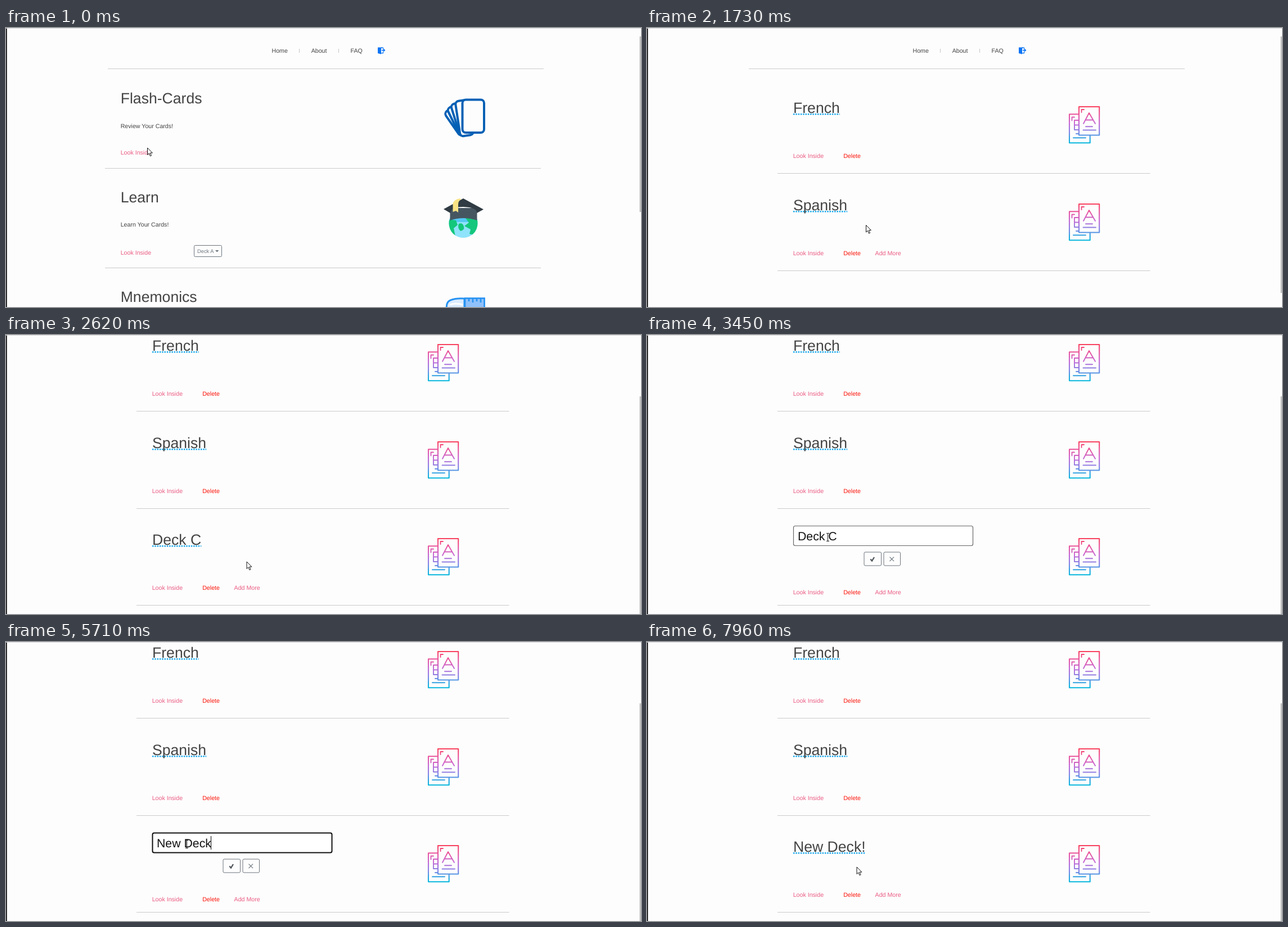
An HTML page with a canvas for the animation above (8000 ms loop, 1129 by 496 pixels).

```html
<!DOCTYPE html>
<html lang="en">
<head>
<meta charset="utf-8">
<title>Flash cards</title>
<style>
  html, body { margin: 0; width: 100%; height: 100%; overflow: hidden; background: #fdfdfd; }
  canvas { display: block; }
</style>
</head>
<body>
<canvas id="stage" width="1129" height="496"></canvas>
<script>
const ctx = document.getElementById('stage').getContext('2d', { alpha: false });
const LOOP = 8000, BODY = 10.64, HEAD = 26.6, FIELD = 21.28, ROW = 172.5;
const PINK = '#ea5a82', RED = '#fb1208', INK = '#444', GRAY = '#6c757d', RULE = '#cbcbcb', PAPER = '#fdfdfd';

// [start time, x, y, shape]
const pointer = [
  [0, 251, 212.5, 'arrow'], [120, 241, 219, 'hand'], [400, 241, 219, 'arrow'],
  [770, 244, 220, 'arrow'], [890, 256, 221, 'arrow'], [1010, 276, 221, 'arrow'],
  [1130, 302, 222, 'arrow'], [1250, 326, 222, 'arrow'], [1370, 341, 223, 'arrow'],
  [1490, 349, 262, 'arrow'], [1610, 366, 310, 'arrow'], [1730, 389, 350, 'arrow'],
  [1850, 409, 380, 'arrow'], [1970, 422, 396, 'arrow'], [2090, 429, 398, 'hand'],
  [2350, 427.5, 402.5, 'arrow'], [2770, 425, 403, 'arrow'], [2910, 390, 386, 'arrow'],
  [3050, 350, 369, 'arrow'], [3170, 320, 359, 'hand'], [3450, 321.5, 359.5, 'beam'],
  [6670, 326.5, 361.5, 'beam'], [6790, 337.5, 366.5, 'beam'], [6910, 343.5, 368.5, 'beam'],
  [7060, 360, 379, 'arrow'], [7180, 387, 394, 'arrow'], [7300, 411, 404, 'hand'],
  [7570, 408, 404, 'arrow'], [7690, 399, 402, 'arrow'], [7810, 389, 399, 'arrow'],
  [7960, 372.5, 399.5, 'arrow']
];
const scroll = [[0, 0], [2350, 6.7], [2500, 112], [2620, 123]];
// [start time, text, first selected character, caret shown]
const typing = [
  [3450, 'Deck C', 9, false], [3590, 'Deck C', 5, false], [3870, 'Deck C', 0, false],
  [4770, 'N', 9, true], [5050, 'Ne', 9, true], [5170, 'New', 9, true], [5290, 'New D', 9, true],
  [5440, 'New De', 9, true], [5590, 'New Dec', 9, true], [5710, 'New Deck', 9, true],
  [6240, 'New Deck!', 9, true], [6790, 'New Deck!', 9, false], [7300, 'New Deck!', 9, true]
];
const at = (steps, t) => steps.filter(s => s[0] <= t).pop();

function font(size) {
  ctx.font = `${size}px "Liberation Sans", Arial, sans-serif`;
}
function text(str, x, y, size = BODY, color = INK) {
  font(size);
  ctx.fillStyle = color;
  ctx.fillText(str, x, y);
}
function box(x, y, w, h, color) {
  ctx.fillStyle = color;
  ctx.fillRect(x, y, w, h);
}
function shape(d, fill, stroke, width = 1) {
  const path = new Path2D(d);
  if (fill) { ctx.fillStyle = fill; ctx.fill(path); }
  if (stroke) { ctx.strokeStyle = stroke; ctx.lineWidth = width; ctx.stroke(path); }
}
function round(x, y, w, h, r, fill, stroke, width = 1) {
  ctx.beginPath();
  ctx.roundRect(x, y, w, h, r);
  if (fill) { ctx.fillStyle = fill; ctx.fill(); }
  ctx.strokeStyle = stroke;
  ctx.lineWidth = width;
  ctx.stroke();
}
function placed(x, y, draw) {
  ctx.save();
  ctx.translate(x, y);
  draw();
  ctx.restore();
}

function nav() {
  text('Home', 472.5, 44);
  text('About', 542.7, 44);
  text('FAQ', 612.5, 44);
  box(521, 37, 1, 7, '#c4c4c4');
  box(591, 37, 1, 7, '#c4c4c4');
  shape('M661 34.5H669V36L667 36V46.5L661 45Z', '#0b74f5');
  shape('M667 35H670.5V37.5M670.5 42V44.7H667', null, '#0b74f5', 1.2);
  shape('M668 38.7H671V36.5L674.5 39.5L671 42.5V40.4H668Z', '#0b74f5');
  box(181, 72, 775, 1, RULE);
}

function fanIcon() {
  const blue = '#0460b5';
  for (let i = 4; i > 0; i--) {
    placed(808, 193, () => {
      ctx.rotate(-i * 8.7 * Math.PI / 180);
      const h = 67 - i * 4;
      round(0, -h, 24, h, 6, PAPER, blue, 4);
    });
  }
  round(811.5, 127.5, 38.5, 58.5, 6, PAPER, blue, 4);
}

function globeIcon() {
  ctx.save();
  ctx.beginPath();
  ctx.arc(813, 347.5, 25.5, 0, 7);
  ctx.clip();
  box(785, 320, 56, 56, '#8fe3fb');
  box(785, 320, 56, 25, '#55c8f5');
  shape('M786 340L800 342L803 350L796 356L799 370L786 364Z', '#14c77c');
  shape('M817 338H842V356L832 368L824 366L826 358L815 352L823 346Z', '#14c77c');
  shape('M805 348Q812 345 814 353Q816 359 808 361Q802 355 805 348Z', '#14c77c');
  ctx.restore();
  shape('M789.5 320H837.5V342Q813 334 789.5 342Z', '#465661');
  shape('M778 322L813 303L849 322.5L837 329Q838 319 813 318Q790 318 790 329Z', '#303b43');
  shape('M807 303Q796 305 794.5 312V327L800 325L804 328V314Q804 307 809 305Z', '#fae384');
}

function memoryIcon() {
  shape('M783.5 500Q782 487 790 484Q800 480 815 481V500Z', '#dcecff', '#2793f2', 3);
  shape('M789 492Q800 488 812 492', null, '#fff', 3);
  box(815, 479, 37, 20, '#90c1fa');
  shape('M816 499V480.5H850.5V499M823 481V486M830 481V488M837 481V486M844 481V488', null, '#2793f2', 2.6);
}

function homePage(hover) {
  const sections = [
    ['Flash-Cards', 134.3, 'Review Your Cards!', 178, 225],
    ['Learn', 309.8, 'Learn Your Cards!', 353, 403],
    ['Mnemonics', 486.8]
  ];
  sections.forEach(([title, y, note, noteY, linkY], i) => {
    text(title, 203.7, y, HEAD);
    if (!note) return;
    text(note, 203.7, noteY);
    text('Look Inside', 203.7, linkY, BODY, hover && !i ? '#c93d66' : PINK);
  });
  box(176, 249, 775, 1, RULE);
  box(176, 426, 775, 1, RULE);
  round(334.5, 386.5, 49, 20, 2, null, GRAY);
  text('Deck A', 340, 399.8, 9.31, GRAY);
  shape('M372 395H378.4L375.2 398.4Z', GRAY);
  fanIcon();
  globeIcon();
  memoryIcon();
}

function deckIcon() {
  const fade = ctx.createLinearGradient(0, 0, 0, 67);
  [[0, '#f9425c'], [.22, '#ea559c'], [.45, '#c566d4'], [.68, '#8584e6'], [.85, '#2da4e2'], [1, '#00bbdc']]
    .forEach(([stop, color]) => fade.addColorStop(stop, color));
  ctx.lineJoin = ctx.lineCap = 'round';
  shape('M18 1H54.2V51.5H18ZM18 14.3H1V65.3H37.7V52', null, fade, 2.1);
  shape('M22.5 11V6H27M5.5 25.5V19.5H10M36 12L26 31M36 12L47 31M29.5 24.5H42.5M30 36.3H42M25.5 42.5H48', null, fade, 1.9);
  shape('M17 25H10V42H17M10 33.5H17M13 49H17M8 56.3H30', null, fade, 1.9);
  ctx.lineJoin = 'miter';
  ctx.lineCap = 'butt';
}

function editor([, value, from, caret], hover) {
  const focused = value !== 'Deck C' || from < 9;
  round(260.5, 339.5, 319, 35, 3, '#fff', focused ? '#101010' : '#666', focused ? 2 : 1.2);
  font(FIELD);
  const end = 268 + ctx.measureText(value).width;
  const start = 268 + ctx.measureText(value.slice(0, from)).width;
  text(value, 268, 364.5, FIELD, '#111');
  if (start < end) {
    box(start, 341, end - start, 32, '#0078d7');
    text(value.slice(from), start, 364.5, FIELD, '#fff');
  }
  if (caret) box(Math.floor(end), 345, 1, 24, '#000');
  round(386, 386, 30.5, 24, 2, hover ? GRAY : null, GRAY);
  round(421, 386, 29.5, 24, 2, null, GRAY);
  shape('M397.3 398.6L400 401.6L404 395', null, hover ? '#fff' : '#4c5257', 2.2);
  shape('M431.5 394.7L439 402.2M439 394.7L431.5 402.2', null, GRAY, 1.2);
}

function deck(i, title, last, editing) {
  placed(0, Math.round(i * ROW), () => {
    if (!editing) {
      font(HEAD);
      const width = ctx.measureText(title).width;
      ctx.setLineDash([2.5, 1.8]);
      shape(`M260 153.3H${260 + width}`, null, '#18a8ec', 2.4);
      ctx.setLineDash([]);
      text(title, 260, 151, HEAD);
    }
    const y = editing ? 239 : 231;
    text('Look Inside', 259.7, y, BODY, PINK);
    text('Delete', 349.2, y, BODY, RED);
    if (last) text('Add More', 405.6, y, BODY, PINK);
    box(232, 258, 662.5, 1, RULE);
    placed(750, 139, deckIcon);
  });
}

const cursors = {
  arrow: () => shape('M.5 .5V13L3.4 10.3L5.4 15.2L7.5 14.3L5.4 9.6H9.4Z', '#fff', '#111'),
  hand: () => shape('M-1.3 10V1.5Q0 -.3 1.3 1.5V6Q3 5 4 6.5Q6 5.7 6.6 7.3Q9 7 9 9V13L7 17.5H-1L-4.5 11.5Q-4.5 9 -2.6 10Z', '#fff', '#111'),
  beam: () => shape('M-2.5 -7H-.7L0 -6.3L.7 -7H2.5M0 -6.3V6.3M-2.5 7H-.7L0 6.3L.7 7H2.5', null, '#222', 1.1)
};

function render(t) {
  const home = t < 650, three = t >= 2230, editing = t >= 3450 && t < 7570;
  const top = at(scroll, t)[1];
  box(0, 0, 1129, 496, PAPER);
  placed(0, -top, () => {
    nav();
    if (home) return homePage(t >= 120);
    deck(0, 'French');
    deck(1, 'Spanish', !three);
    if (three) deck(2, t < 7570 ? 'Deck C' : 'New Deck!', true, editing);
  });
  if (editing) editor(at(typing, t), t >= 7300);

  const thumb = home ? 312 : three ? 398 : 456;
  box(1126.5, 15 + top * .765, 2.5, thumb, '#c0c0c0');
  box(0, 0, 1129, 1, '#d9d9d9');
  box(0, 1, 1.6, 495, '#000');
  const [, x, y, kind] = at(pointer, t);
  placed(x, y, cursors[kind]);
}

function tick() {
  render(performance.now() % LOOP);
  requestAnimationFrame(tick);
}
ctx.textRendering = 'geometricPrecision';
tick();
</script>
</body>
</html>
```
